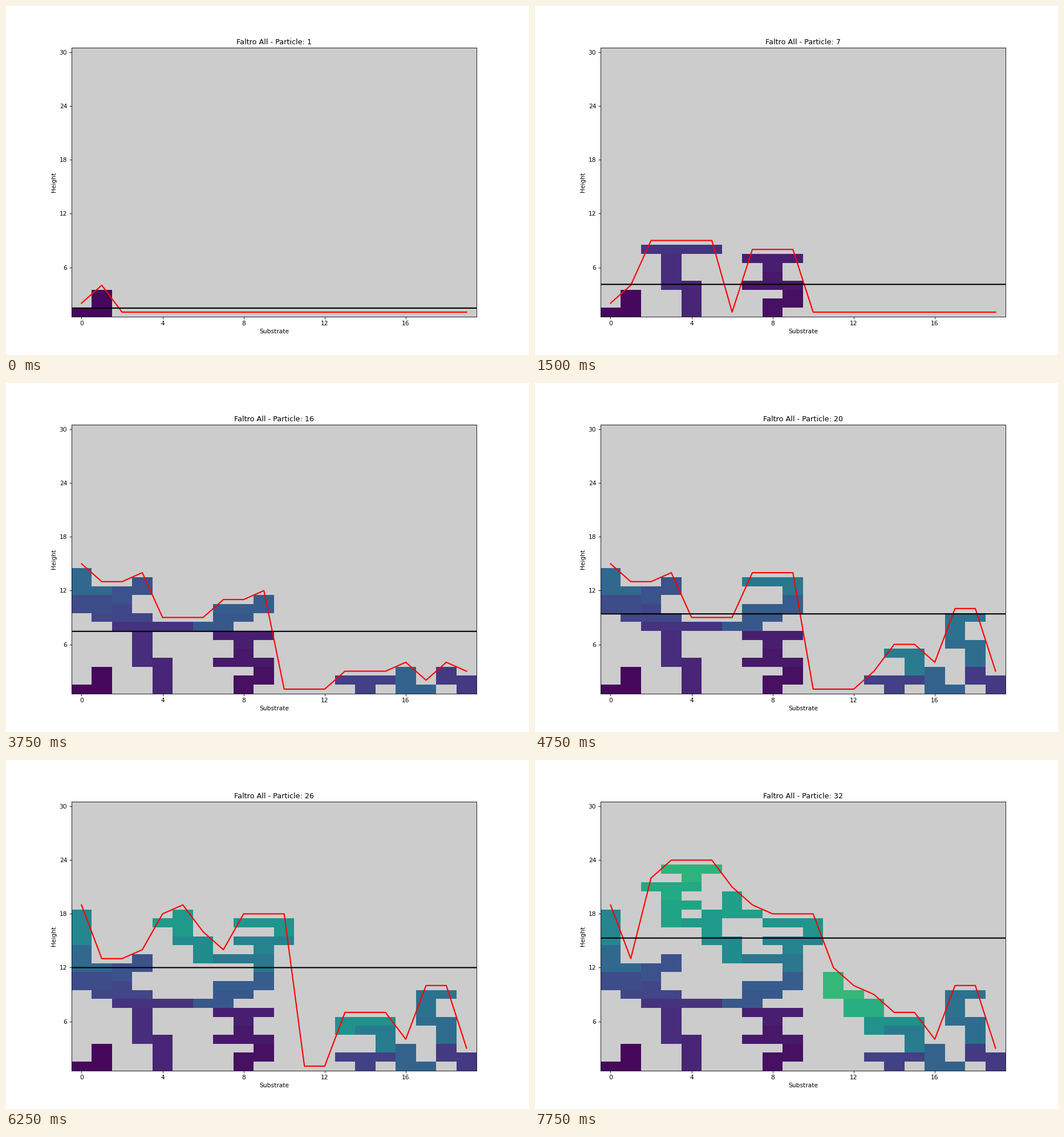
These frames come from a looping animation (917 px wide and 611 px high, 8 s). A matplotlib script:

```python
import numpy as np
import matplotlib.pyplot as plt
from matplotlib.animation import FuncAnimation

W, H = 917, 611
DPI = W / 12
COLS, ROWS = 20, 30
STEPS, INTERVAL = 32, 250
MAX_ID = 48

# Each shape lists its rows from bottom to top.
SHAPES = {
    "O": "##/##",
    "I": "#/#/#/#",
    "I_flat": "####",
    "T_up": "###/.#.",
    "T_down": ".#./###",
    "T_left": ".#/##/.#",
    "S": "##./.##",
    "S_tall": "#./##/.#",
    "Z_tall": ".#/##/#.",
    "J": "##/.#/.#",
    "J_top": "#./#./##",
    "J_flat": "..#/###",
    "L": "##/#./#.",
    "L_top": ".#/.#/##",
    "L_flat": "###/..#",
    "L_over": "#../###",
}

# Resting places in order of arrival: shape, left column, bottom row.
DROPS = [
    ("J", 0, 1), ("S_tall", 8, 1), ("T_up", 7, 4), ("T_down", 7, 6),
    ("I", 4, 1), ("I", 3, 4), ("I_flat", 2, 8), ("Z_tall", 18, 1),
    ("T_down", 13, 1), ("T_up", 1, 9), ("O", 0, 10), ("S_tall", 2, 11),
    ("S", 6, 8), ("L_flat", 7, 10), ("L", 16, 1), ("L", 0, 12),
    ("L_top", 17, 4), ("J_top", 17, 7), ("J_flat", 7, 12), ("L_top", 14, 3),
    ("T_down", 8, 14), ("I", 0, 15), ("L_top", 5, 13), ("L_over", 13, 5),
    ("J_flat", 8, 16), ("T_left", 4, 16), ("L", 6, 18), ("J_top", 3, 17),
    ("T_down", 2, 20), ("O", 12, 7), ("T_down", 3, 22), ("L", 11, 9),
    ("Z_tall", 1, 22),
]


def build_grid(count):
    """Grid of particle numbers after the first drops; 0 means empty."""
    grid = np.zeros((ROWS, COLS))
    for number, (shape, col, row) in enumerate(DROPS[:count], 1):
        for dy, line in enumerate(SHAPES[shape].split("/")):
            for dx, mark in enumerate(line):
                if mark == "#":
                    grid[row - 1 + dy, col + dx] = number
    return grid


def surface(grid):
    """First free height above every column."""
    levels = np.arange(1, ROWS + 1)[:, None]
    return np.where(grid > 0, levels, 0).max(axis=0) + 1


# The small margin keeps the pixel size from rounding down.
fig, ax = plt.subplots(figsize=((W + 1e-3) / DPI, (H + 1e-3) / DPI), dpi=DPI)
ax.set_facecolor("0.8")

mesh = ax.pcolormesh(np.arange(COLS + 1) - 0.5, np.arange(ROWS + 1) + 0.5,
                     np.ma.masked_equal(build_grid(1), 0),
                     cmap="viridis", vmin=0, vmax=MAX_ID)
top_line, = ax.plot(np.arange(COLS), np.ones(COLS), color="red", lw=2)
mean_line = ax.axhline(1, color="black", lw=2, snap=False)
title = ax.set_title("")

ax.set_xlim(-0.5, COLS - 0.5)
ax.set_ylim(0.5, ROWS + 0.5)
ax.set_xticks(range(0, COLS, 4))
ax.set_yticks(range(6, ROWS + 1, 6))
ax.set_xlabel("Substrate")
ax.set_ylabel("Height")


def update(step):
    count = step + 1
    grid = build_grid(count)
    mesh.set_array(np.ma.masked_equal(grid, 0))
    top_line.set_ydata(surface(grid))
    # The mean already counts the next particle.
    mean = surface(build_grid(count + 1)).mean()
    mean_line.set_ydata([mean, mean])
    title.set_text(f"Faltro All - Particle: {count}")
    return mesh, top_line, mean_line, title


anim = FuncAnimation(fig, update, frames=STEPS, interval=INTERVAL,
                     repeat=True, repeat_delay=0, blit=False)
plt.show()
```
